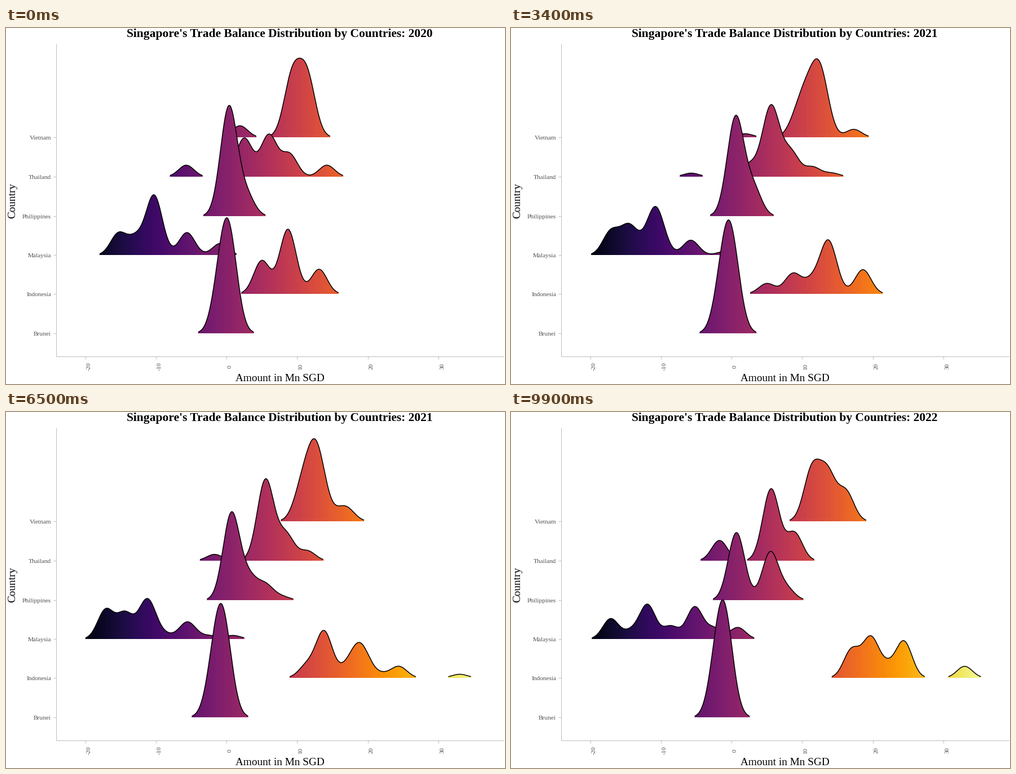
Animation of 885x632 px, one loop 10 s. Source, as a matplotlib script:

```python
import numpy as np
import matplotlib.pyplot as plt
from matplotlib.animation import FuncAnimation
from matplotlib.path import Path

W, H, DPI = 885, 632, 64
FRAMES, INTERVAL = 100, 100
PX = 72 / DPI                    # points per pixel
LEFT, RIGHT, TOP, BOTTOM = 89, 883, 28, 583
FIRST_BASE, ROW = 194.5, 69.5
BW = 1.09                        # kernel bandwidth
UNIT = 20.5                      # pixel height of one monthly observation
CUTOFF = 2.08                    # lower parts of a ridge are hidden
FONT = "Liberation Serif"
GREY, LABEL = "#bebebe", "#4d4d4d"

grid = np.linspace(-21.3, 36.3, 1153)


def to_x(value):
    return 391.1 + 12.53 * value


def density(clusters):
    """Sum of bells, one per cluster of months; big clusters are a bit wider."""
    total = np.zeros_like(grid)
    for centre, months in clusters.items():
        widen = months ** 0.04
        total += UNIT * months / widen * np.exp(-((grid - centre) / (BW * widen)) ** 2 / 2)
    return total


fig = plt.figure(figsize=(W / DPI, H / DPI), dpi=DPI, facecolor="white")
ax = fig.add_axes([0, 0, 1, 1])
ax.axis("off")


def text(x, y, s, size, color="black", ha="center", **kw):
    return ax.text(x, y, s, fontsize=size * PX, family=FONT, color=color, ha=ha,
                   va="baseline", rotation_mode="anchor", **kw)


def rule(x, y):
    ax.plot(x, y, color=GREY, lw=PX, solid_capstyle="butt", zorder=1)


class Ridge:
    shades = plt.get_cmap("inferno")(np.linspace(0, 1, 512))[None, :, :3]

    def __init__(self, row, name, *years):
        self.base = round(FIRST_BASE + ROW * row)
        self.years = [density(clusters) for clusters in years]
        self.x = to_x(grid)
        self.fill = ax.imshow(
            self.shades, aspect="auto", interpolation="nearest", zorder=2 + row,
            extent=(self.x[0], self.x[-1], self.base, self.base - 220))
        self.line, = ax.plot([], [], color="black", lw=1.5 * PX, zorder=2.5 + row,
                             solid_joinstyle="round", solid_capstyle="butt")
        text(80, self.base + 4, name, 11.4, LABEL, "right")
        rule([LEFT - 5, LEFT], [self.base - 0.5] * 2)

    def update(self, t):
        """Cross-fade between the yearly densities, t in years."""
        k = min(int(t), len(self.years) - 2)
        height = self.years[k] + (self.years[k + 1] - self.years[k]) * (t - k)
        shown = height >= CUTOFF
        y = self.base - np.where(shown, height, 0)
        outline = np.column_stack([np.r_[self.x, self.x[-1], self.x[0]],
                                   np.r_[y, self.base, self.base]])
        self.fill.set_clip_path(Path(outline), ax.transData)
        self.line.set_data(self.x, np.where(shown, y, np.nan))


# Each year maps a typical amount to the number of months near it.
ridges = [
    Ridge(0, "Vietnam",
          {1.9: 1, 9.3: 5.5, 11.4: 5.5},
          {10.5: 3, 12.6: 8, 17.3: 1},
          {11.4: 4.7, 13.6: 4.2, 16.2: 2.6}),
    Ridge(1, "Thailand",
          {-5.7: 1, 2.5: 3.5, 6: 3.8, 8.9: 2, 14.2: 1},
          {5.5: 8, 8.2: 2.4, 11.5: 1.2},
          {-1.7: 1.8, 5.6: 6.7, 8.9: 2.5}),
    Ridge(2, "Philippines",
          {0.35: 10.4, 2.9: 1.7},
          {0.7: 9, 3.2: 2.7},
          {0.7: 6.3, 5.5: 4.4, 7.9: 0.9}),
    Ridge(3, "Malaysia",
          {-15.3: 1.9, -12.9: 1.4, -10.25: 5.5, -5.6: 2, -0.9: 1},
          {-17.1: 3, -14.4: 3, -11: 4.2, -5.9: 1},
          {-17.1: 1.8, -14.3: 0.6, -11.9: 3.1, -8.6: 1.1, -5.2: 2.9, -2.4: 0.9, 0.9: 1}),
    Ridge(4, "Indonesia",
          {5: 3, 8.7: 6, 13.1: 2.2},
          {11.3: 1.5, 13.8: 6.3, 18.6: 3.2},
          {17: 2.5, 19.7: 3.6, 22: 0.9, 24.4: 3.3, 33: 1}),
    Ridge(5, "Brunei",
          *({0.35 - 0.65 * year: 8.7, -0.95 - 0.6 * year: 3.5} for year in range(3))),
]

rule([LEFT, LEFT], [TOP, BOTTOM])
rule([LEFT, RIGHT], [BOTTOM, BOTTOM])
for value in range(-20, 31, 10):
    rule([to_x(value)] * 2, [BOTTOM, BOTTOM + 5])
    text(to_x(value) + 9, 601, str(value), 11, LABEL, rotation=90)

title = text(485.5, 16, "", 21.55, weight="bold")
text(485.5, 627, "Amount in Mn SGD", 19.2)
text(16, 306.5, "Country", 19.2, rotation=90)

ax.set_xlim(0, W)
ax.set_ylim(H, 0)


def update(i):
    t = 2 * i / (FRAMES - 1)
    title.set_text("Singapore's Trade Balance Distribution by Countries: "
                   f"{round(2020 + t)}")
    for ridge in ridges:
        ridge.update(t)
    return [title]


anim = FuncAnimation(fig, update, frames=FRAMES, interval=INTERVAL, repeat=True)
plt.show()
```
